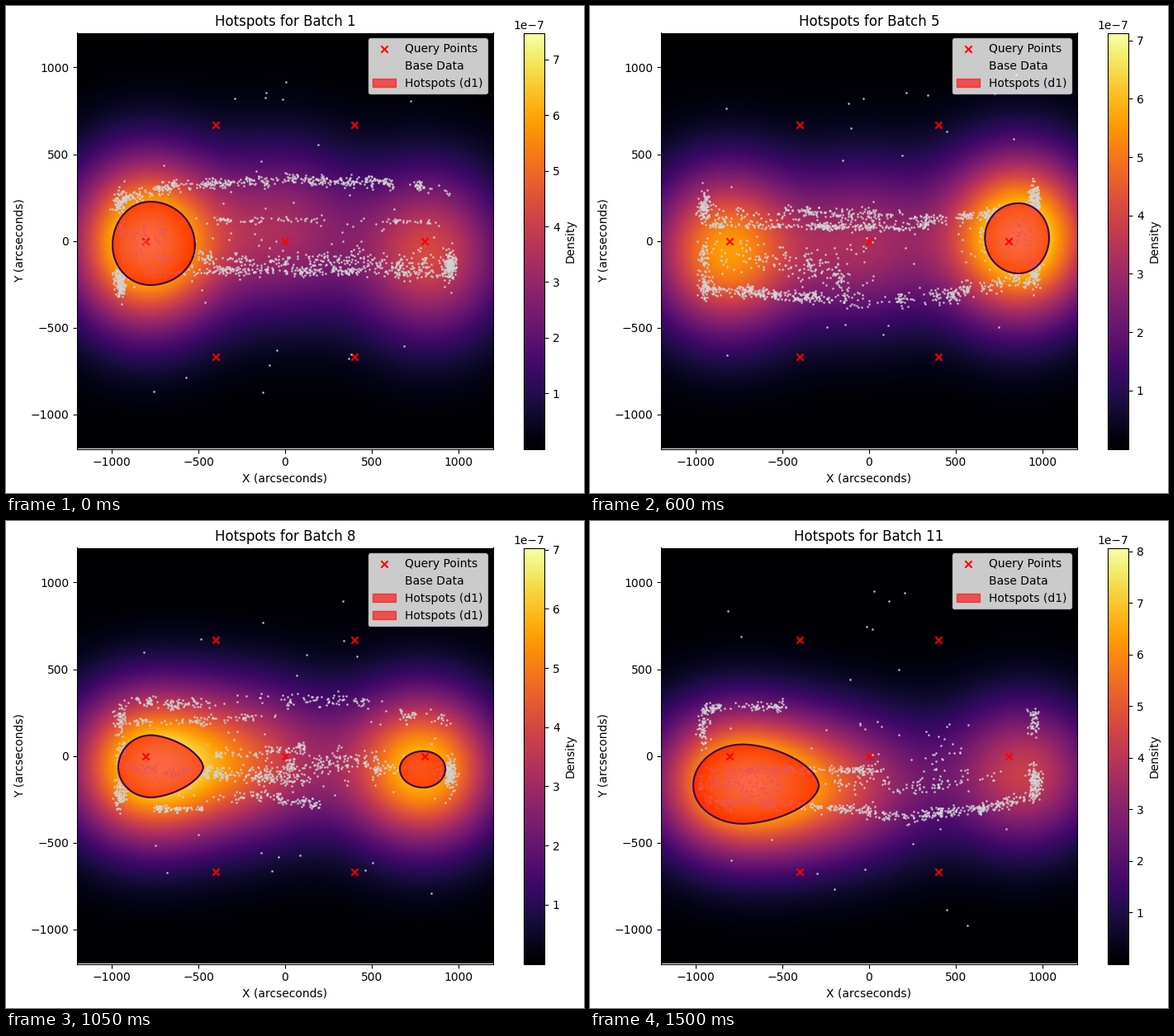
A matplotlib script that plays this animation: 700x590 px, repeating every 1.65 s.

```python
import numpy as np
import matplotlib.pyplot as plt
from matplotlib.animation import FuncAnimation
from matplotlib.patches import Patch

W, H, DPI = 700, 590, 100
LIMIT = 1200
BATCHES = 11
INTERVAL = 150
SIGMA_X = 310

axis = np.linspace(-LIMIT, LIMIT, 253)
GX, GY = np.meshgrid(axis, axis)
density, points, hotspots = {}, {}, {}


def field(top, sigma_y, *lobes):
    """Sum of Gaussian lobes (weight, x, y), scaled to peak at top * 1e-7."""
    total = sum(w * np.exp(-((GX - x) / SIGMA_X) ** 2 / 2
                           - ((GY - y) / sigma_y) ** 2 / 2)
                for w, x, y in lobes)
    return total * top * 1e-7 / total.max()


def strip(rng, x0, x1, left, mid, right, n, spread=17):
    """Clumped dots along a parabola through three heights."""
    count = max(3, n // 9)
    clump = rng.integers(0, count, n)
    t = rng.random(count)[clump] + rng.normal(0, 0.025, n)
    t = np.clip(np.where(rng.random(n) < 0.3, rng.random(n), t), 0, 1)
    y = (left * (1 - t) * (1 - 2 * t) + 4 * mid * t * (1 - t)
         + right * t * (2 * t - 1))
    y += spread * (0.6 * rng.normal(size=count)[clump]
                   + 0.75 * rng.normal(size=n))
    return np.column_stack([x0 + (x1 - x0) * t, y])


def dots(seed, strips, west, east):
    """Strips, dense clusters (y, n) at both limbs, a haze and a few strays."""
    rng = np.random.default_rng(seed)
    parts = [strip(rng, *s) for s in strips]
    for side, clusters in ((-1, west), (1, east)):
        for y, n in clusters:
            parts.append(np.column_stack([side * rng.normal(952, 18, n),
                                          rng.normal(y, 45, n)]))
    parts.append(strip(rng, -900, 930, 0, 0, 0, 70, 140))
    far = rng.uniform(400, 980, 18) * rng.choice([-1, 1], 18)
    parts.append(np.column_stack([rng.uniform(-850, 850, 18), far]))
    return np.vstack(parts)


def outline(left, right, low, high, cx, cy, power=2.0):
    """Egg through four extremes; power < 2 sharpens the right end."""
    a = np.linspace(0, 2 * np.pi, 241)
    c, s = np.cos(a), np.sin(a)
    e = np.where(c > 0, 2 / power, 1)
    x = cx + np.where(c < 0, cx - left, right - cx) * np.sign(c) * np.abs(c) ** e
    y = cy + np.where(s < 0, cy - low, high - cy) * np.sign(s) * np.abs(s) ** e
    return np.array([x, y])


density[1] = field(7.48, 345, (1, -800, -15), (.41, 0, 60), (.57, 840, -80))
hotspots[1] = [outline(-995, -520, -255, 226, -778, -25)]
points[1] = dots(1, [
    (-985, -600, 215, 285, 320, 150), (-600, 600, 318, 347, 335, 330),
    (600, 970, 330, 315, 250, 50), (-450, 900, 120, 125, 105, 90, 9),
    (-950, 450, -90, -105, -105, 220, 26), (430, 920, -100, -130, -130, 110, 35),
    (-900, 920, -175, -175, -190, 310, 13), (-960, -680, 30, 30, 30, 90, 45),
], [(220, 60), (-240, 150)], [(-140, 170)])

density[3] = field(7.2, 303, (.85, -745, -155), (.43, 0, -130), (.97, 830, -95))
hotspots[3] = [outline(-871, -429, -298, -21, -680, -163, 1.85),
               outline(595, 1000, -273, 88, 810, -93)]
points[3] = dots(3, [
    (-960, 30, 130, 45, 0, 250, 30), (30, 980, -5, 50, 150, 260, 38),
    (690, 950, 190, 210, 200, 75), (-890, -420, -180, -170, -170, 130, 35),
    (-880, -50, -235, -290, -325, 190), (-30, 430, -335, -347, -320, 140, 9),
    (430, 960, -310, -270, -220, 130, 25), (-350, 980, -140, -135, -110, 220, 25),
], [(200, 75), (-185, 190)], [])

density[5] = field(7.13, 337, (.76, -830, -60), (.41, -30, -20), (.98, 872, 15))
hotspots[5] = [outline(668, 1038, -188, 217, 862, 18)]
points[5] = dots(5, [
    (-920, 340, 95, 83, 82, 290, 12), (-900, 330, 130, 160, 115, 220, 22),
    (330, 930, 115, 150, 220, 140), (-950, -200, -275, -305, -330, 280),
    (-200, 560, -330, -330, -300, 140, 25), (450, 950, -290, -250, -200, 120, 28),
    (-850, -120, -110, -110, -220, 170, 50), (640, 960, 0, 20, 50, 60, 55),
], [(190, 110), (-80, 50), (-265, 70)], [(240, 150), (-190, 80)])

density[7] = field(6.57, 335, (.6, -860, -35), (.57, -370, 120),
                   (.27, 50, 60), (.97, 878, 125))
hotspots[7] = [outline(734, 995, -22, 266, 868, 124)]
points[7] = dots(7, [
    (-870, -150, 268, 285, 300, 260, 14), (-150, 700, 298, 315, 330, 150),
    (660, 980, 290, 285, 270, 70), (740, 860, 365, 390, 420, 30, 4),
    (-870, -300, 0, -20, -10, 130, 28), (-860, -50, -85, -88, -85, 160, 13),
    (-420, 70, 115, 125, 120, 40, 22), (-250, 350, 35, 25, -40, 90),
    (100, 940, -50, -45, -55, 150, 26),
], [(230, 55), (-140, 150)], [(-95, 130), (190, 30)])

density[8] = field(7.03, 315, (.85, -825, -65), (.38, -360, -40),
                   (.28, 0, -30), (.87, 800, -78))
hotspots[8] = [outline(-962, -472, -240, 119, -772, -66, 1.62),
               outline(662, 924, -183, 27, 797, -76)]
points[8] = dots(8, [
    (-920, -350, 330, 300, 310, 100), (-900, -50, 205, 210, 240, 90, 12),
    (-300, 560, 340, 335, 310, 80, 28), (550, 960, 260, 240, 220, 45, 20),
    (-920, 150, -75, -105, -125, 350, 23), (-400, 110, 10, 25, 45, 90, 13),
    (0, 900, -40, -60, -90, 190, 34), (-760, -480, -300, -305, -305, 90, 12),
    (-480, 220, -255, -230, -290, 110),
], [(210, 60), (0, 40), (-215, 100)], [(-105, 130)])

density[10] = field(6.28, 350, (.72, -805, -30), (.36, -360, -50),
                    (.28, 100, -80), (.97, 812, -85))
tilted = outline(703, 897, -202, 21, 800, -88)
tilted[0] += 0.14 * (tilted[1] + 88)
hotspots[10] = [tilted]
points[10] = dots(10, [
    (-900, -130, 200, 180, 170, 150, 30), (-780, -120, 130, 108, 95, 120),
    (-120, 360, 110, 140, 150, 70, 28), (360, 900, 110, 130, 190, 180, 24),
    (-900, 0, -215, -305, -325, 290), (-730, -600, -330, -360, -380, 50),
    (-50, 980, -345, -340, -170, 420, 20), (-700, -250, -60, -75, -85, 50, 20),
], [(190, 90), (-190, 100)], [(205, 110), (-140, 60)])

density[11] = field(8.07, 300, (.8, -830, -152), (.5, -400, -180),
                    (.3, 50, -180), (.56, 900, -105))
hotspots[11] = [outline(-1014, -290, -392, 66, -728, -172, 1.72)]
points[11] = dots(11, [
    (-960, -450, 270, 292, 285, 120, 14), (-950, 100, -75, -85, -78, 240, 14),
    (-980, -500, -150, -165, -160, 170, 38), (-930, 0, -260, -285, -315, 240),
    (-50, 420, -330, -345, -320, 120, 20), (400, 980, -325, -290, -215, 180),
    (-300, 720, -150, -165, -130, 85, 24),
], [(160, 60)], [(-150, 130), (205, 50)])

# The data window slides, so a batch shares half its dots with each neighbour.
for b in (2, 4, 6, 9):
    density[b] = (density[b - 1] + density[b + 1]) / 2
    before, after = hotspots[b - 1][-1], hotspots[b + 1][0]
    hotspots[b] = [(before + after) / 2]
    rng = np.random.default_rng(b)
    points[b] = np.vstack([p[rng.random(len(p)) < 0.5]
                           for p in (points[b - 1], points[b + 1])])

fig = plt.figure(figsize=(W / DPI, H / DPI), dpi=DPI)
bottom, height = 53.5 / H, 504 / H
ax = fig.add_axes([86 / W, bottom, 504 / W, height])
cax = fig.add_axes([627 / W, bottom, 25.2 / W, height])

image = ax.imshow(density[1], origin="lower", cmap="inferno", aspect="auto",
                  extent=(-LIMIT, LIMIT, -LIMIT, LIMIT),
                  interpolation="bilinear", zorder=0)
image.set_clim(1e-10, density[1].max())
fig.colorbar(image, cax=cax, label="Density")

queries = ax.scatter([-402, 402, -805, 0, 805, -402, 402],
                     [671, 671, 0, 0, 0, -671, -671],
                     color="red", marker="x", label="Query Points", zorder=1)
base = ax.scatter([], [], s=1, color="lightgray", alpha=0.7,
                  label="Base Data", zorder=1.1)
ax.set(xlim=(-LIMIT, LIMIT), ylim=(-LIMIT, LIMIT),
       xlabel="X (arcseconds)", ylabel="Y (arcseconds)")
ticks = range(-1000, 1001, 500)
ax.set_xticks(ticks)
ax.set_yticks(ticks)

hotspot_artists = []


def draw(i):
    batch = i + 1
    image.set_data(density[batch])
    image.set_clim(1e-10, density[batch].max())
    base.set_offsets(points[batch])
    while hotspot_artists:
        hotspot_artists.pop().remove()
    for x, y in hotspots[batch]:
        hotspot_artists.extend(ax.fill(x, y, color="red", alpha=0.6, lw=0, zorder=2))
        hotspot_artists.extend(ax.plot(x, y, color="#3a0454", lw=1.5, zorder=2.1))
    patches = [Patch(color="red", alpha=0.6, label="Hotspots (d1)")
               for _ in hotspots[batch]]
    ax.legend(handles=[queries, base] + patches, loc="upper right")
    ax.set_title(f"Hotspots for Batch {batch}")
    return []


anim = FuncAnimation(fig, draw, frames=BATCHES, init_func=lambda: draw(0),
                     interval=INTERVAL, repeat=True, repeat_delay=0, blit=False)
plt.show()
```
